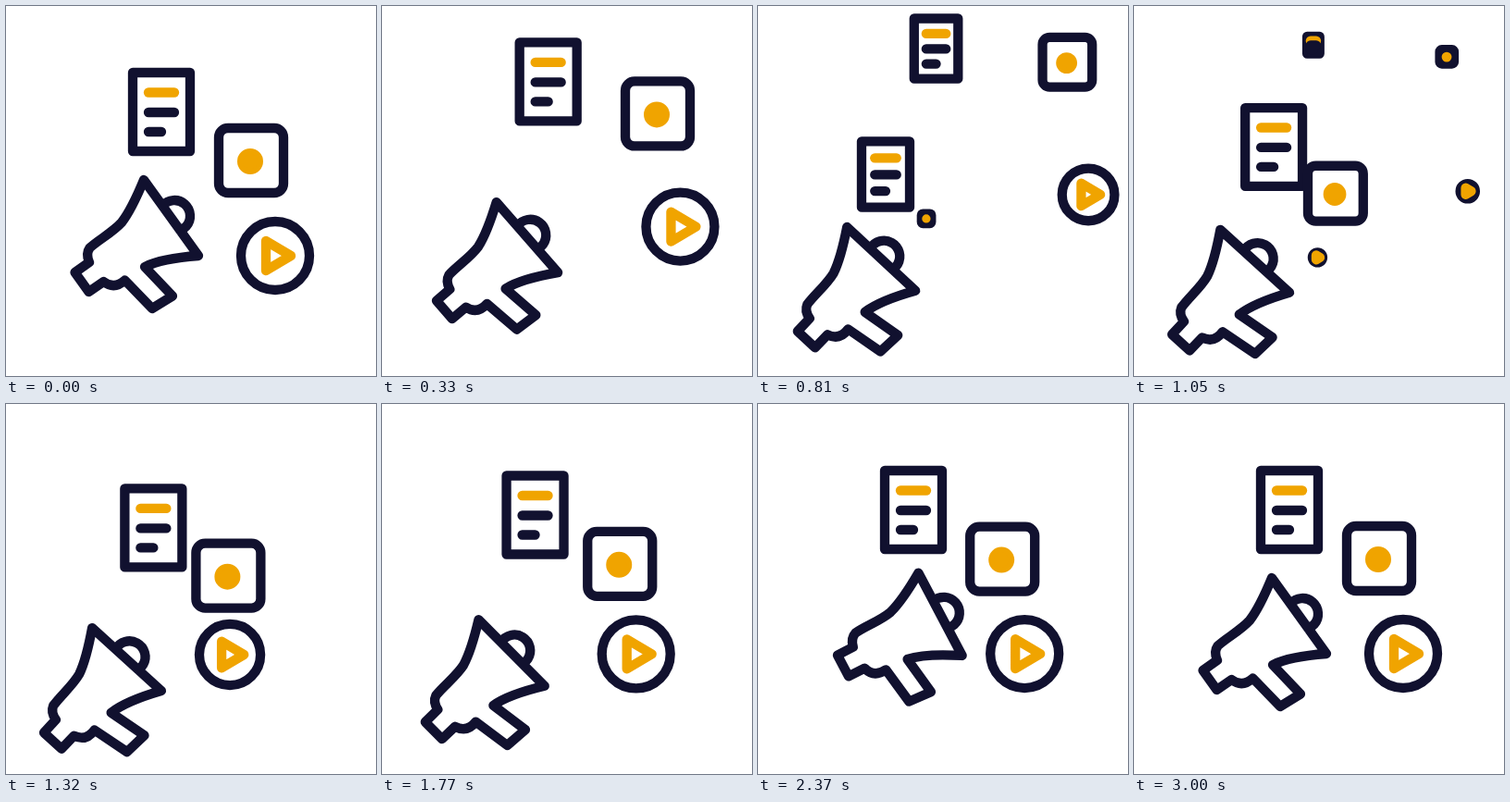
Recreate the animation shown at these times as an HTML page with a canvas. Size 400x400 px, loop 5.09 s.

```html
<!DOCTYPE html>
<html lang="en">
<head>
<meta charset="utf-8">
<title>Megaphone</title>
<style>
  html, body { margin: 0; width: 100%; height: 100%; overflow: hidden; background: #fff; }
  canvas { display: block; width: 400px; height: 400px; }
</style>
</head>
<body>
<canvas id="stage" width="400" height="400"></canvas>
<script>
const ctx = document.getElementById('stage').getContext('2d');
const NAVY = '#11112f', AMBER = '#f0a400';
const LOOP = 5090, MOVE = 3000, STEP = 30;

const clamp = v => Math.min(1, Math.max(0, v));
const span = (t, from, to) => clamp((t - from) / (to - from));
const smooth = u => u * u * (3 - 2 * u);
const mix = (a, b, u) => a + (b - a) * u;

function bezierEase(x1, y1, x2, y2) {
  const at = (a, b, w) => 3 * w * (1 - w) * ((1 - w) * a + w * b) + w ** 3;
  return x => {
    let lo = 0, hi = 1;
    for (let i = 0; i < 24; i++) {
      const mid = (lo + hi) / 2;
      if (at(x1, x2, mid) < x) lo = mid; else hi = mid;
    }
    return x <= 0 ? 0 : x >= 1 ? 1 : at(y1, y2, lo);
  };
}
const leaveEase = bezierEase(0.3, 0.1, 0.25, 1);

// Scales the path only; the line weight stays constant.
function trace(draw, pose, color, { width = 10.3, fill = false } = {}) {
  ctx.save();
  ctx.translate(pose.x, pose.y);
  ctx.rotate(pose.turn || 0);
  ctx.scale(pose.scale, pose.scale);
  ctx.beginPath();
  draw();
  ctx.restore();
  ctx.lineWidth = width;
  ctx.strokeStyle = ctx.fillStyle = color;
  if (fill) ctx.fill();
  ctx.stroke();
}

function bar(x, y, length) {
  ctx.moveTo(x, y);
  ctx.lineTo(x + length, y);
}

function page(pose) {
  trace(() => ctx.rect(-31, -42.5, 62, 85), pose, NAVY);
  trace(() => bar(-14, -21, 28), pose, AMBER);
  trace(() => { bar(-14, 0.5, 28); bar(-14, 21.5, 14); }, pose, NAVY);
}

function badge(pose) {
  trace(() => ctx.roundRect(-35, -35, 70, 70, 10), pose, NAVY);
  trace(() => ctx.arc(-1, 1, 11, 0, 2 * Math.PI), pose, AMBER, { width: 6, fill: true });
}

function player(pose) {
  trace(() => ctx.arc(0, 0, 37, 0, 2 * Math.PI), pose, NAVY);
  trace(() => {
    ctx.moveTo(-10, -16);
    ctx.lineTo(17, 0);
    ctx.lineTo(-10, 16);
    ctx.closePath();
  }, pose, AMBER);
}

// home: resting centre, out: offset when leaving, from: offset when emerging
const icons = [
  { draw: page, home: [168, 114.5], out: [26, -72.5], from: [-56.3, 126.6], start: 550 },
  { draw: badge, home: [265, 167], out: [73.5, -112.5], from: [-90.5, 68.5], start: 780 },
  { draw: player, home: [291, 270], out: [70, -70], from: [-101, 2], start: 1020 }
];

function place(icon, offset, amount, scale) {
  if (scale <= 0) return;
  icon.draw({
    x: icon.home[0] + offset[0] * amount,
    y: icon.home[1] + offset[1] * amount,
    scale
  });
}

function drawIcon(icon, t, gone) {
  place(icon, icon.out, gone, 1 - span(t, 520, 1120) ** 2);
  const age = t - icon.start;
  if (age <= 0) return;
  const left = Math.max(0, Math.exp(-age / 435) - 0.017);
  place(icon, icon.from, left, 1 - (1 - clamp(age / 570)) ** 3);
}

const MOUTH = { x: 178.5, y: 229 };
const REST = [0, 0, 0], BACK = [-48, 47, -12], FORWARD = [19, -2, 8];

function hornPose(t, gone) {
  let a = REST, b = BACK, u = gone;
  if (t > 2410) [a, b, u] = [FORWARD, REST, smooth(span(t, 2410, MOVE))];
  else if (t > 1570) [a, b, u] = [BACK, FORWARD, smooth(span(t, 1570, 2410))];
  const [dx, dy, deg] = a.map((v, i) => mix(v, b[i], u));
  return { x: MOUTH.x + dx, y: MOUTH.y + dy, turn: deg * Math.PI / 180, scale: 1 };
}

function horn(pose) {
  trace(() => {
    ctx.translate(-MOUTH.x, -MOUTH.y);
    ctx.moveTo(149, 188);
    ctx.bezierCurveTo(142, 205, 135, 221, 125, 234);
    ctx.bezierCurveTo(115, 245, 101, 252, 90.5, 261.5);
    ctx.quadraticCurveTo(86, 268, 90, 277);
    ctx.lineTo(74.5, 288);
    ctx.lineTo(89.5, 309);
    ctx.lineTo(105.5, 298);
    ctx.quadraticCurveTo(117, 307, 128.5, 296.5);
    ctx.lineTo(158, 327);
    ctx.lineTo(180, 313.5);
    ctx.lineTo(150, 282);
    ctx.quadraticCurveTo(168, 273, 208, 270);
    ctx.closePath();
    ctx.moveTo(169.2, 215.9);
    ctx.arc(182, 227, 17, -2.427, 1.184);
  }, pose, NAVY);
}

function render(time) {
  const t = Math.min(MOVE, Math.floor((time % LOOP) / STEP + 0.001) * STEP);
  const gone = leaveEase(t / 1140);
  ctx.fillStyle = '#fff';
  ctx.fillRect(0, 0, 400, 400);
  ctx.lineCap = ctx.lineJoin = 'round';
  icons.forEach(icon => drawIcon(icon, t, gone));
  horn(hornPose(t, gone));
}

let begin;
function tick(now) {
  begin ??= now;
  render(now - begin);
  requestAnimationFrame(tick);
}
render(0);
requestAnimationFrame(tick);
</script>
</body>
</html>
```
